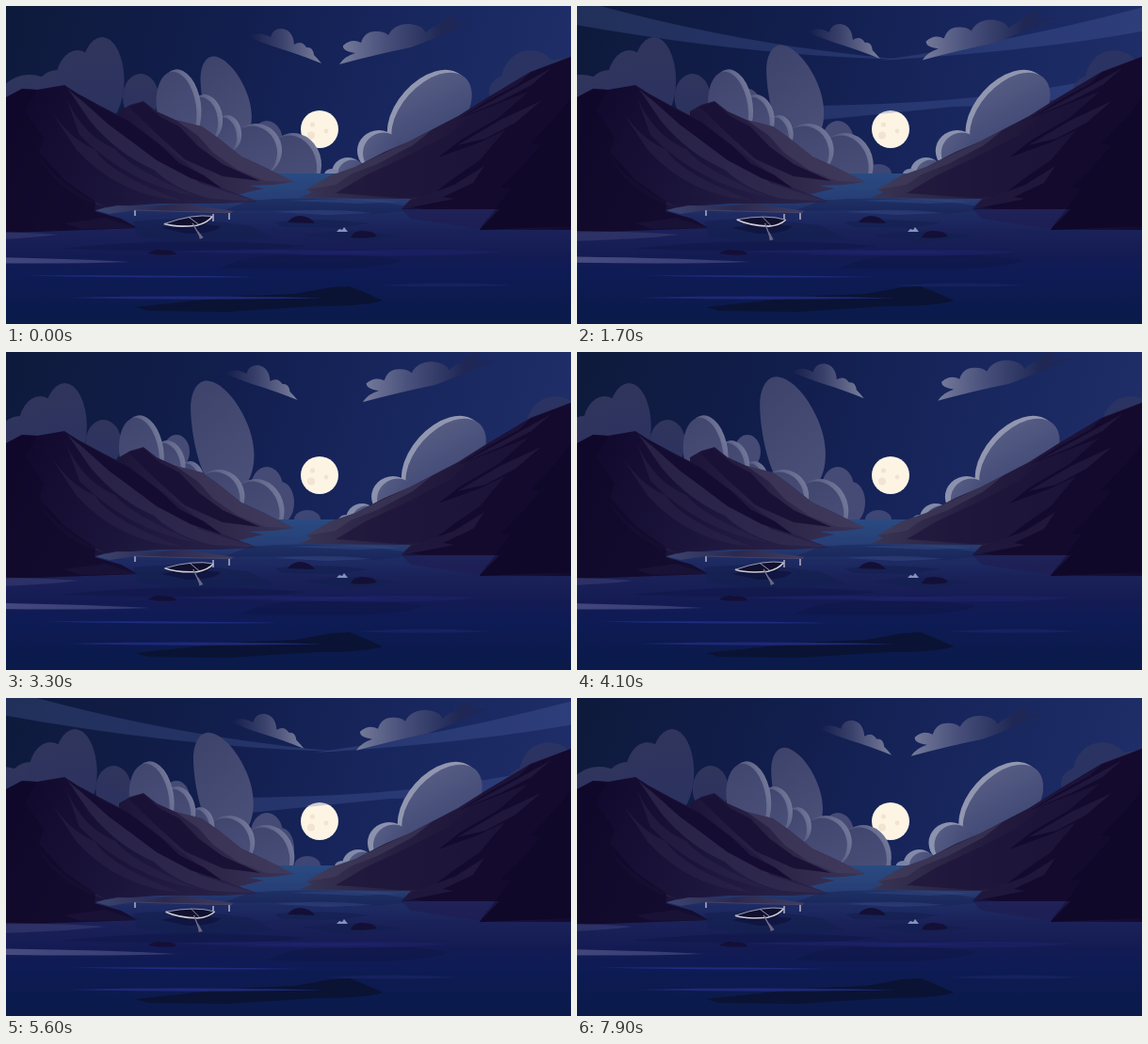
These frames come from a looping animation (600x338 px, 8000 ms). An HTML page:

```html
<!DOCTYPE html>
<html lang="en">
<head>
<meta charset="utf-8">
<title>Moonlit lake</title>
<style>
html, body { margin: 0; width: 100%; height: 100%; overflow: hidden; background: #0a1b4c; }
svg { display: block; width: 100vw; height: 100vh; }
</style>
</head>
<body>
<svg viewBox="0 0 600 338" preserveAspectRatio="none">
  <defs>
    <linearGradient id="sky" x1="0" y1="0" x2="1" y2=".15">
      <stop offset="0" stop-color="#0e1a3b"/><stop offset=".4" stop-color="#121e4d"/>
      <stop offset=".65" stop-color="#17255c"/><stop offset="1" stop-color="#1f2d68"/>
    </linearGradient>
    <linearGradient id="water" x1="0" y1="0" x2="0" y2="1">
      <stop offset="0" stop-color="#294b82"/><stop offset=".16" stop-color="#273f76"/>
      <stop offset=".27" stop-color="#1e2b63"/><stop offset=".4" stop-color="#1a2058"/>
      <stop offset=".53" stop-color="#151b53"/><stop offset=".66" stop-color="#0e1b55"/>
      <stop offset="1" stop-color="#0a1a49"/>
    </linearGradient>
    <linearGradient id="backCloud" x1="0" y1="0" x2="0" y2="1">
      <stop offset="0" stop-color="#30355d"/><stop offset="1" stop-color="#2b325f"/>
    </linearGradient>
    <linearGradient id="tall" x1="0" y1="0" x2=".5" y2="1">
      <stop offset="0" stop-color="#3d426b"/><stop offset="1" stop-color="#4a4f78"/>
    </linearGradient>
    <linearGradient id="puff" x1="0" y1="0" x2=".3" y2="1">
      <stop offset="0" stop-color="#40456e"/><stop offset="1" stop-color="#494f78"/>
    </linearGradient>
    <linearGradient id="rim" x1=".3" y1=".5" x2="1" y2=".3">
      <stop offset="0" stop-color="#484e77"/><stop offset="1" stop-color="#757a9b"/>
    </linearGradient>
    <linearGradient id="rightPuff" x1="0" y1="0" x2="1" y2=".6">
      <stop offset="0" stop-color="#5a6086"/><stop offset="1" stop-color="#3b4472"/>
    </linearGradient>
    <linearGradient id="topLeft">
      <stop offset="0" stop-color="#141e4b"/><stop offset=".45" stop-color="#3a416b"/><stop offset="1" stop-color="#7a7f9d"/>
    </linearGradient>
    <linearGradient id="topRight">
      <stop offset="0" stop-color="#777c9b"/><stop offset=".35" stop-color="#474f7a"/><stop offset=".75" stop-color="#1f2754"/><stop offset="1" stop-color="#1d2758"/>
    </linearGradient>
    <linearGradient id="nearLeft" x1="0" y1=".4" x2="1" y2=".7">
      <stop offset="0" stop-color="#120a2e"/><stop offset=".5" stop-color="#1c153b"/><stop offset="1" stop-color="#2b244a"/>
    </linearGradient>
    <linearGradient id="farLeft">
      <stop offset="0" stop-color="#1d1539"/><stop offset="1" stop-color="#3a3456"/>
    </linearGradient>
    <linearGradient id="nearRight">
      <stop offset="0" stop-color="#393553"/><stop offset=".4" stop-color="#251d40"/><stop offset="1" stop-color="#140a2f"/>
    </linearGradient>
    <linearGradient id="pier">
      <stop offset="0" stop-color="#3c4570"/><stop offset=".5" stop-color="#2c284e"/><stop offset="1" stop-color="#403d62"/>
    </linearGradient>
    <linearGradient id="streak">
      <stop offset="0" stop-color="#4c5084"/><stop offset="1" stop-color="#333870"/>
    </linearGradient>
  </defs>

  <rect width="600" height="338" fill="url(#sky)"/>
  <g fill="#fdf4e4">
    <circle cx="333" cy="131" r="20"/>
    <g fill="#f1e4d1"><circle cx="325.5" cy="126" r="2.6"/><circle cx="340" cy="133" r="2.4"/><circle cx="324" cy="137.5" r="4"/></g>
  </g>

  <g id="windA" fill="#5268a8" fill-opacity=".28">
    <path d="M-60-4L0 9Q270 73 600 9L660-4V22L600 37Q270 75 0 38L-60 26Z"/>
    <path d="M305 3Q350 9 410 5Q450 2 480-4H330Z"/>
  </g>
  <g id="windB" fill="#5268a8" fill-opacity=".28">
    <path d="M-80-30L25 0Q180 42 345 57Q150 52-80 5Z"/>
    <path d="M320 58Q480 35 620-4L680 10Q540 45 320 58Z"/>
    <path d="M230 106Q400 106 530 82L660 60V75Q520 105 400 107Q320 115 230 124Z"/>
  </g>
  <g id="windC">
    <path d="M-60 30L0 44Q30 58 46 72Q20 72-60 66Z" fill="#5268a8" fill-opacity=".3"/>
    <path d="M336 122.5Q370 121 408 125Q370 128 336 122.5ZM230 112Q255 113 272 116L230 120Z" fill="#25356a"/>
  </g>

  <path id="topA" fill="url(#topLeft)" d="M258 33Q268 26 281 33Q283 24 293 24Q305 26 306 41Q314 36 319 44Q326 43 327 52Q330 55 335 61Q310 51 290 45Q272 39 258 33Z"/>
  <path id="topB" fill="url(#topRight)" d="M354 62Q360 53 371 50Q357 48 358 42Q367 34 377 39Q381 26 394 27Q402 27 406 31Q412 19 428 19Q442 20 446 28Q452 22 458 21Q464 10 478 9Q477 16 474 20Q488 17 498 16Q460 33 430 44Q395 51 354 62Z"/>

  <g id="leftBack"></g>
  <path id="tallCloud" fill="url(#tall)" d="M194 60C193 37 202 25 212 25.5C235 27 264 72 264 108C264 136 250 152 235 152C206 152 195 88 194 60Z"/>
  <g fill="#464b76">
    <ellipse cx="181" cy="106" rx="14" ry="18"/><ellipse cx="277" cy="144" rx="17" ry="22"/>
    <ellipse cx="292" cy="160" rx="14" ry="22"/><ellipse cx="320" cy="178" rx="14" ry="10" fill="#3d4674"/>
  </g>
  <g id="leftFront"></g>
  <g id="rightBack"></g>
  <g id="rightFront"></g>

  <rect y="178" width="600" height="160" fill="url(#water)"/>

  <!-- far shores -->
  <path fill="url(#farLeft)" d="M120 112L132 105 146 101 160 112 180 121 208 128 225 140 250 160 272 170 290 179 306 187 285 190 258 191 274 194 248 200 120 190Z"/>
  <path fill="#433d5e" opacity=".65" d="M180 121L208 128 226 141 250 160 290 179 306 187 276 186 246 174 220 156 204 138Z"/>
  <path fill="#1a1236" d="M130 107L146 102 164 118 184 128 204 149 230 168 270 186 230 181 190 163 160 136Z"/>
  <path fill="url(#nearRight)" d="M311 204L325 198 319 195 345 180 371 171 402 155 428 144 480 117 510 98 557 70 600 54V238H503L510 228 524 216 420 215 430 205Z"/>
  <path fill="#474261" opacity=".5" d="M319 195L345 180 371 171 428 144 452 132 432 148 394 168 366 179 350 190Z"/>
  <path fill="#1d153a" d="M350 199L382 180 425 160 470 137 511 99 557 70 600 54V170L540 195 500 200 420 204Z" opacity=".7"/>
  <path fill="#140a2e" d="M600 54L557 71 544 83 514 99 482 119 519 105 555 91 523 119 482 143 459 161 503 145 530 132 503 164 474 184 456 198 430 207 420 216H524L510 227 503 238 600 234Z"/>
  <g fill="#261d44" opacity=".7">
    <path d="M484 118L534 91 579 66 558 84 525 101Z"/>
    <path d="M479 148L525 121 568 101 541 124 509 141Z"/>
    <path d="M430 207L476 190 508 170 496 188 464 203 476 205 420 216Z"/>
  </g>
  <path fill="#0f0829" d="M600 98L583 119 557 146 568 148 544 175 525 193 536 194 503 238 600 234Z"/>

  <!-- near left shore -->
  <path fill="url(#nearLeft)" d="M0 97L17 88 33 89 62 84 76 93 100 106 131 122 165 148 199 173 229 193 268 208 229 210 162 210 105 214 94 218 122 226 140 236 0 241Z"/>
  <path fill="#362f54" opacity=".6" d="M65 87Q82 106 124 121Q136 145 168 157Q186 168 205 188Q238 199 267 208L219 205Q182 197 157 174Q118 157 89 122Z"/>
  <path fill="#150c31" d="M70 91L99 107 131 123 164 148 184 167 210 180 229 194 196 183 160 164 132 143 109 126Z"/>
  <g fill="#2d2549" opacity=".5">
    <path d="M48 112Q70 143 94 152Q112 180 187 207Q120 202 75 153Z"/>
    <path d="M64 98Q82 138 116 152Q132 173 204 203Q130 190 78 137Z"/>
    <path d="M33 158Q55 190 107 214Q60 204 33 158Z"/>
  </g>
  <path fill="#100829" d="M0 97L17 88 33 89 20 111 40 140 35 155 62 185 95 208 94 218 122 226 140 236 0 241Z" opacity=".65"/>
  <path fill="#1d173c" d="M62 231L105 225 140 236 80 237Z" opacity=".6"/>

  <!-- water -->
  <g fill="#142150" opacity=".7">
    <path d="M258 207Q330 201 408 210L445 216 390 221 296 217 230 218Z" opacity=".6"/>
    <path d="M285 230Q330 224 385 231L354 236 294 235Z"/>
    <path d="M135 229Q190 222 260 234L284 247 190 251 140 245Z"/>
    <path d="M315 244Q365 235 418 245L370 251Z"/>
  </g>
  <path d="M300 207Q370 203 420 208L374 210ZM285 219Q335 214 390 220L340 222Z" fill="#354981" opacity=".5"/>
  <path d="M420 216H524L503 237 430 226Z" fill="#201d50" opacity=".65"/>
  <g id="driftRight">
    <path d="M-100 239Q10 239 56 243Q10 249-100 251Z" fill="#33376a" opacity=".75"/>
    <path d="M-100 266Q40 267 132 272Q40 275-100 272Z" fill="url(#streak)"/>
    <path d="M20 286.5Q150 285.5 268 288Q150 289.5 20 286.5Z" fill="#1f2b80"/>
    <path d="M228 279Q250 263 325 265Q385 264 421 270Q400 280 320 280Z" fill="#0f184a" opacity=".8"/>
  </g>
  <g id="driftLeft">
    <path d="M395 297Q470 292 540 297Q470 300 395 297Z" fill="#1b2665" opacity=".65"/>
    <path d="M300 264Q410 256 530 261Q470 268 300 264Z" fill="#20246c" opacity=".55"/>
  </g>
  <path d="M60 258Q180 244 318 255Q250 264 60 258Z" fill="#10194b" opacity=".7"/>
  <path d="M170 261Q300 257 415 262Q310 265 170 261Z" fill="#21256f" opacity=".55"/>
  <path d="M137 320L240 309 307 306 345 299 365 298 380 304 400 313Q383 319 330 319L235 325 151 324Z" fill="#0a1333"/>
  <path d="M65 310Q200 307 338 310.5Q190 313 65 310Z" fill="#1f2878"/>

  <!-- rocks -->
  <g fill="#140f36">
    <path d="M299 230Q304 223 313 223Q323 224 328 231Z"/>
    <path d="M366 246Q369 239 378 239Q391 239 394 245Q379 248 366 246Z"/>
    <path d="M151 263Q160 257 168 260Q178 259 181 264Q165 266 151 263Z"/>
  </g>
  <path d="M351 240L354 237 357 238 359 235 363 240Z" fill="#8493bd"/>

  <!-- pier -->
  <g stroke="#a9a8bf" stroke-width="1.6">
    <path d="M137 217V223M220 221V229M237 219V227" fill="none"/>
    <path d="M95 217L118 212 154 213 188 210 242 218 238 220 190 219 137 217 110 221Z" fill="url(#pier)" stroke="none"/>
    <path d="M137 217L188 218.5 240 219.5" stroke="#4d4b6c" stroke-width=".7" fill="none"/>
  </g>

  <path d="M165 236Q195 229 228 234Q222 242 192 242Z" fill="#0d123b" opacity=".7"/>
  <g id="boat">
    <path d="M170 227Q181 235 194 235H211Q220 232 222 227L209 225 198 224 184 225Z" fill="#100f2c"/>
    <path d="M170 227Q182 233 204 234Q216 233 222 227" fill="none" stroke="#cdccda" stroke-width="1.6"/>
    <path d="M170 227Q186 224 199 224Q212 224 222 227M197 224L206 233" fill="none" stroke="#a3a2b8" stroke-width=".9"/>
    <path d="M200 231L206 247" fill="none" stroke="#77758f" stroke-width="1.3"/>
    <path d="M204 239L209 248 205 249Z" fill="#6a6784"/>
  </g>
</svg>
<script>
const parts = Object.fromEntries([...document.querySelectorAll('g[id], path[id]')].map(el => [el.id, el]));

const oval = (x, y, rx, ry, fill, turn = 0) =>
  `<ellipse cx="${x}" cy="${y}" rx="${rx}" ry="${ry}" fill="${fill}" transform="rotate(${turn} ${x} ${y})"/>`;

// A darker oval shifted over a pale one leaves a moonlit crescent.
const rimmed = (x, y, rx, ry, shift, rim, fill, turn) =>
  oval(x, y, rx, ry, rim, turn) + oval(x + shift, y + 2.5, rx - 1, ry, fill, turn);

parts.leftBack.innerHTML = [
  [25, 99, 32, 26], [55, 92, 24, 24], [76, 84, 24, 37], [102, 79, 23.5, 46], [143, 97, 19, 25]
].map(c => oval(...c, 'url(#backCloud)')).join('');

parts.leftFront.innerHTML = [
  [306, 168, 29, 33], [266, 153, 27, 28], [236, 135, 14, 19], [212, 119, 18, 25], [185, 106, 22, 39]
].map(c => rimmed(...c, -4, 'url(#rim)', 'url(#puff)', -8)).join('');

parts.rightBack.innerHTML =
  oval(557, 80, 31, 33, '#2a3361') + oval(592, 82, 32, 26, '#293360') + oval(535, 91, 22, 18, '#2a3361');

parts.rightFront.innerHTML =
  rimmed(448, 113, 33, 53, 4, '#9297b0', 'url(#rightPuff)', 42) +
  rimmed(396, 154, 23, 22, 5, '#8c92ae', 'url(#rightPuff)') +
  rimmed(363, 177, 17, 16, 5, '#848ba9', 'url(#rightPuff)') +
  oval(346, 179, 8, 6, '#7a83a6');

const move = (id, x, y = 0) => parts[id].setAttribute('transform', `translate(${x} ${y})`);
const swing = (t, period) => 1 - Math.abs(2 * (t % period) / period - 1);

function gust(id, phase, peak, speed) {
  const away = phase - peak;
  parts[id].setAttribute('opacity', Math.max(0, Math.min(1, 1.5 - Math.abs(away) / 400)));
  move(id, away * speed);
}

function draw(time) {
  const t = Math.floor(time / 100) * 100 % 8000;
  const sky = swing(t, 8000), tide = swing(t, 4000), phase = t % 4000;
  move('leftBack', -48 * sky);
  move('leftFront', -48 * sky);
  parts.tallCloud.setAttribute('transform', `translate(250 150) scale(${.775 + .225 * sky}) translate(-250 -150)`);
  move('rightBack', 32 * sky);
  move('rightFront', 18.3 * sky);
  move('topA', -31 * sky, -12 * sky);
  move('topB', 30 * sky, -10.5 * sky);
  gust('windA', phase, 900, -.08);
  gust('windB', phase, 1700, -.08);
  gust('windC', phase, 2500, -.08);
  move('driftRight', 62 * tide);
  move('driftLeft', -72 * tide);
  parts.boat.setAttribute('transform',
    `translate(${-2 * (1 - tide)} ${.5 * (1 - tide)}) rotate(${-9 + 11 * tide} 196 230)`);
}

const start = performance.now();
function loop() {
  draw(performance.now() - start);
  requestAnimationFrame(loop);
}
loop();
</script>
</body>
</html>
```
